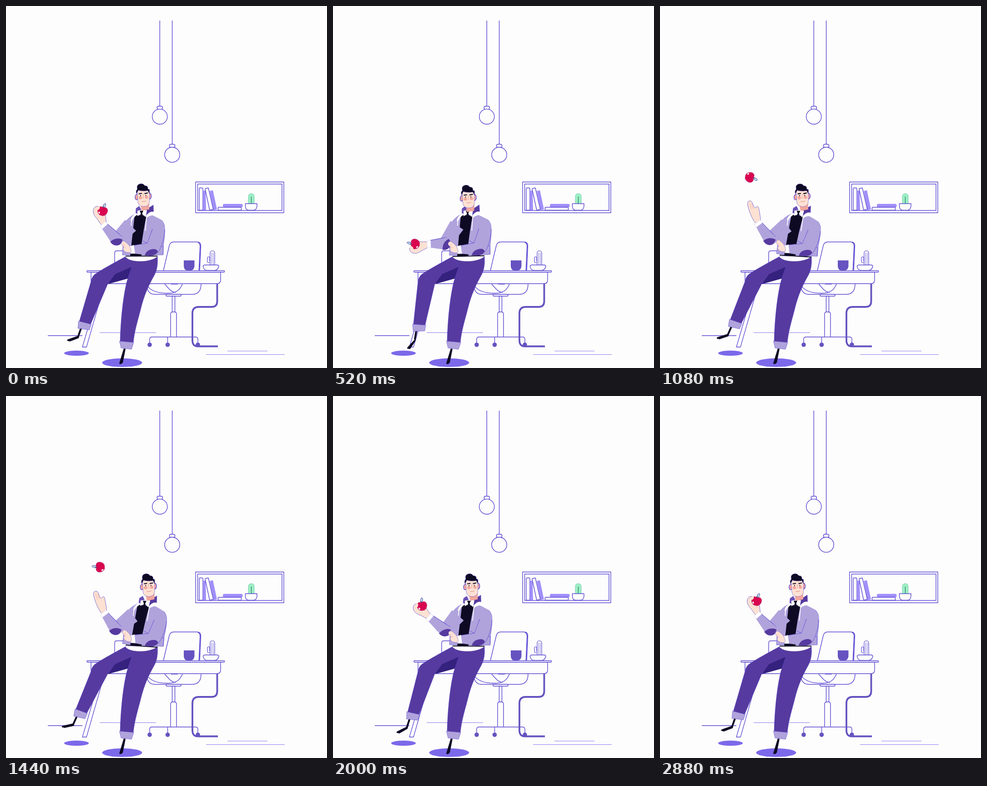
These frames come from a looping animation (706 px wide and 794 px high, 2.92 s). An HTML page with a canvas:

```html
<!DOCTYPE html>
<html lang="en">
<head>
<meta charset="utf-8">
<title>Break at the desk</title>
<style>
html, body { margin: 0; width: 100%; height: 100%; overflow: hidden; background: #fdfdfd; }
canvas { display: block; }
</style>
</head>
<body>
<canvas id="stage" width="706" height="794"></canvas>
<script>
const ctx = document.getElementById('stage').getContext('2d');
const LOOP = 2920, STEP = 40;
const BG = '#fdfdfd', LINE = '#5b49d2', SOLID = '#6653c0', LILAC = '#a08ffa';
const JACKET = '#b0a3dc', PANTS = '#563a9f', DARK = '#35217e', INK = '#0e0a24';
const SKIN = '#fde1d3', BLUSH = '#f3a79c', RED = '#d9064f', GROUND = '#7c69ea';
const RAD = Math.PI / 180;

// time, wrist x/y, elbow x/y, hand angle
const ARM = [
  [0, 217, 483, 243, 512, -110],
  [520, 214, 522, 246, 521, -192],
  [800, 210, 490, 244, 513, -151],
  [1160, 219, 479, 241, 511, -108],
  [1440, 218, 480, 241, 511, -112],
  [1680, 217, 483, 243, 512, -120],
  [2000, 215, 488, 246, 514, -137],
  [2440, 217, 485, 244, 512, -116],
  [2920, 217, 483, 243, 512, -110]
];
// time, torso tilt, head x, head y
const BODY = [
  [0, 0, 0, 0],
  [520, -0.02, -2, 3],
  [800, 0.045, 2, 1],
  [1240, 0.07, 3, 0],
  [1440, 0.07, 3, 0],
  [2000, 0.01, 2, 0],
  [2440, 0, 0, 0],
  [2920, 0, 0, 0]
];
// time, shin angle, toe angle
const LEG = [
  [0, 19.3, 20],
  [520, 9.4, 49],
  [800, 18.8, 42],
  [1200, 24.6, 13],
  [1440, 24.6, 13],
  [1720, 21.5, 20],
  [2000, 17.4, 27],
  [2440, 18.9, 21],
  [2920, 19.3, 20]
];
const HELD = [[3, -6], [18, -9], [34, -15], [47, -9], [47, 3], [34, 4], [30, 12], [20, 9], [3, 6]];
const OPEN = [[3, -6], [20, -9], [40, -9], [57, -6], [56, 5], [35, 3], [41, 14], [24, 11], [3, 6]];
const RELEASE = 880, PEAK = 1240, CATCH = 1680;

const mix = (a, b, u) => a + (b - a) * u;
const clamp = u => Math.max(0, Math.min(1, u));

// Monotone cubic through the key rows
function sample(rows, t) {
  let i = 0;
  while (i < rows.length - 2 && t >= rows[i + 1][0]) i++;
  const a = rows[i], b = rows[i + 1], h = b[0] - a[0], u = (t - a[0]) / h;
  const rate = (k, c) => (rows[k + 1][c] - rows[k][c]) / (rows[k + 1][0] - rows[k][0]);
  const tangent = (k, c) => {
    if (k === 0 || k === rows.length - 1) return 0;
    const p = rate(k - 1, c), q = rate(k, c);
    return p * q <= 0 ? 0 : 2 * p * q / (p + q);
  };
  return a.slice(1).map((v, j) => {
    const c = j + 1, m = tangent(i, c) * h, n = tangent(i + 1, c) * h, d = b[c] - v;
    return v + u * (m + u * (3 * d - 2 * m - n + u * (m + n - 2 * d)));
  });
}

function shape(d, fill, stroke, width = 1.4) {
  const p = typeof d === 'string' ? new Path2D(d) : d;
  if (fill) { ctx.fillStyle = fill; ctx.fill(p); }
  if (stroke) { ctx.strokeStyle = stroke; ctx.lineWidth = width; ctx.stroke(p); }
}
const line = (d, width = 1.4, color = LINE) => shape(d, null, color, width);

function oval(x, y, rx, ry, fill, stroke, angle = 0) {
  const p = new Path2D();
  p.ellipse(x, y, rx, ry, angle, 0, Math.PI * 2);
  shape(p, fill, stroke);
}
function box(x, y, w, h, r, fill, stroke = LINE) {
  const p = new Path2D();
  p.roundRect(x, y, w, h, r);
  shape(p, fill, stroke);
}
function poly(pts, fill, stroke, width) {
  const p = new Path2D();
  pts.forEach(([x, y]) => p.lineTo(x, y));
  p.closePath();
  shape(p, fill, stroke, width);
}
function blob(pts, fill, stroke, width) {
  const p = new Path2D(), n = pts.length;
  for (let i = 0; i <= n; i++) {
    const [x, y] = pts[i % n], [nx, ny] = pts[(i + 1) % n];
    if (i === 0) p.moveTo((x + nx) / 2, (y + ny) / 2);
    else p.quadraticCurveTo(x, y, (x + nx) / 2, (y + ny) / 2);
  }
  shape(p, fill, stroke, width);
}
function at(x, y, angle, draw) {
  ctx.save();
  ctx.translate(x, y);
  ctx.rotate(angle);
  draw();
  ctx.restore();
}
function limb(a, b, ra, rb, fill) {
  const dir = Math.atan2(b[1] - a[1], b[0] - a[0]), s = Math.sin(dir), c = Math.cos(dir);
  poly([[a[0] - s * ra, a[1] + c * ra], [b[0] - s * rb, b[1] + c * rb],
        [b[0] + s * rb, b[1] - c * rb], [a[0] + s * ra, a[1] - c * ra]], fill);
}

function lamp(x, y) {
  line(`M${x} 32V${y - 23}`);
  box(x - 6, y - 23, 12, 7, 3, BG);
  oval(x, y, 16.6, 16.6, BG, LINE);
}

function shelf() {
  box(417, 386, 194, 67.5, 0, null);
  box(421.5, 390.5, 185.5, 58, 0, null);
  box(425, 399, 8, 49, 2, BG);
  shape('M433 405H439L440 448H433Z', LILAC);
  shape('M448 406L455 404L464 446L457 448Z', LILAC);
  shape('M438 402Q438 400 440 400L445 399L456 446L448 448Z', BG, LINE);
  box(477, 434, 43.5, 7.5, 3, LILAC, null);
  box(466.5, 441.5, 51, 6.5, 1, BG);
  shape('M533 434V418Q533 411.5 539.5 411.5Q546 411.5 546 418V434Z', '#9cf0c3', '#6fbfa8', 0.8);
  line('M539.5 418V434', 1.2, '#2f6c70');
  shape('M526.5 433.5H552V439Q551 448 544 448H534Q527 448 526.5 439Z', BG, LINE);
}

function chair() {
  shape('M346 581L359 526Q361 517.5 369 517.5H420Q428.5 517.5 428.5 526L426 581', BG, LINE);
  line('M422 518.5Q427 520 427 527L424.5 580', 1.8);
  line('M309 610C310 625 316 632 326 632.5H410C423 632 429 624 429 610');
  line('M309 611C318 627 338 630 355 630C374 630 382 624 388 610');
  line('M349 610L360 622Q366 628 374 628');
  line('M363 610H378');
  box(352, 632.5, 33, 4, 2, BG);
  box(365.5, 636.5, 6, 36, 0, BG);
  shape('M362 726V676Q362 671 367 671H370Q375 671 375 676V726', BG, LINE);
  line('M316 739V731Q316 726 321 726H417Q422 726 422 731V739M355.5 726V739');
  [316, 355.5, 422].forEach(x => oval(x, 743, 4.8, 4.8, SOLID));
}

function desk() {
  poly([[168, 748], [177, 748], [217, 609], [209, 609]], BG, LINE, 1.3);
  line('M464.5 609V648Q464.5 660 452 660H424Q410 660 410 674V733Q410 746.5 422 746.5H466', 3.8, SOLID);
  line('M239 564V542Q239 537 244 537H266');
  shape('M187 583.5V602Q187 609 194 609H464Q472 609 472 601V583.5Z', BG, LINE);
  box(178, 580.5, 302.5, 3.2, 1, BG);
  shape('M391 558H414.5V571Q413 580 406 580H399Q392 580 391 571Z', SOLID);
  shape('M449 568V542Q449 537 454 537Q459 537 459 542V568', BG, LINE, 1.2);
  line('M452.5 568V541M456 568V541', 0.8);
  line('M449 563H446Q443 563 443 559V553Q443 550 446 550Q448 550 448 553V560', 1.2);
  shape('M433.5 571Q434 568 438 568H464Q468 568 468 571Q466 580 458 580H443Q435 580 433.5 571Z', BG, LINE);
}

function room() {
  ctx.fillStyle = BG;
  ctx.fillRect(0, 0, 706, 794);
  lamp(338.3, 242.7);
  lamp(365.6, 326.3);
  shelf();
  line('M92 723H168', 1.3);
  line('M206 716.5H330M487 756.8H575M440 764.5H613', 1, '#8a7cf0');
  chair();
  desk();
  oval(155, 761.5, 27, 5.8, GROUND);
  oval(255.5, 782.3, 44, 9.5, GROUND);
}

function legs(t) {
  const [shin, toe] = sample(LEG, t), a = shin * RAD, c = Math.cos(a), s = Math.sin(a);
  const local = (x, y) => [206 + x * c - y * s, 605 + x * s + y * c];
  const ankle = local(-5, 109), bend = local(-5, 129);
  const tip = [bend[0] - 25.5 * Math.cos(toe * RAD), bend[1] + 25.5 * Math.sin(toe * RAD)];

  ctx.lineJoin = 'round';
  line(`M${ankle}L${bend}`, 4, INK);
  poly([[bend[0] + 2, bend[1] - 2], [bend[0] + 1, bend[1] + 3], [tip[0] + 6, tip[1] + 1.5],
        tip, [tip[0] + 1, tip[1] - 2]], INK, INK, 1);
  const left = local(-13.5, 97), right = local(12, 96);
  shape(`M264 549C242 561 212 577 196 588Q189 593 187 604L${left}L${right}L224 609L277 573L290 549Z`, PANTS, LINE, 0.6);
  poly([local(-15.5, 96.5), local(13.5, 94), local(13.5, 107), local(-11.5, 112)], JACKET, LINE, 0.6);

  shape('M277 572L240 588L224 610L271 597Z', DARK);
  shape('M259 751L263 752L257 782Q252 788 249 784Z', INK);
  shape('M262 549H333C334 566 333 578 326 591C314 612 304 634 297 662C290 690 283 710 280 738L251 736C252 696 256 648 264 612C267 598 273 583 277 572Z', PANTS, LINE, 0.6);
  shape('M249.5 735L281 738L276 753L253 750Z', JACKET, LINE, 0.6);
  shape('M262 549C270 564 321 563 333 549Z', '#fff');
}

function torso() {
  shape('M288 454C276 460 264 468 260 480L256 546H345L346 527C348 510 350 496 349 488C350 474 338 463 319 451Z', JACKET, LINE, 0.7);
  shape('M283 458L309 460C304 482 301 502 298 523V549H273Z', INK);
  shape('M286 444L293 439L299 450L285 459Z', '#6a50b3', LINE, 0.6);
  shape('M309 446L324 436.5L324.5 452L309 461Z', PANTS, LINE, 0.6);
  shape('M289 449L299 447L310 448L307 463L299 455L289 461Z', '#fff');
  shape('M294 449L302 449L299.5 455L302 463H294L296.5 455Z', INK);
  shape('M308 460Q318 447 328 453Q343 462 347 472Q333 464 322 459Q314 460 308 466Z', '#fff');
  shape('M286 454L290 457Q279 463 276 474L274 470Q276 460 286 454Z', '#fff');
  line('M276 468L274.5 493M309 462L306.5 493', 1.6, '#fff');
  line('M322 489L312 521L301 515', 0.9);
  line('M266 487L262 513M336 527H346V546', 0.8);
  line('M263 548.5H333', 2, INK);
}

function restingArm() {
  shape('M331 466C346 470 350 482 349 492C348 512 342 529 334 541Q329 548 318 547L282 543L280 525L311 520L322 489Z', JACKET);
  line('M349 490C348 512 342 529 334 541M282 525L311 520L322 489', 0.8);
  shape('M305 547Q309 534 325 533Q332 533 334 539Q330 547 318 548Z', PANTS);
  shape('M272 527L281 524.5L284 543L274 543Z', '#fff', '#d9d3f4', 0.5);
  blob([[252, 522], [257, 514], [265, 519], [273, 527], [277, 541], [264, 541], [256, 534], [260, 528]], SKIN, LINE, 0.5);
  line('M255 525L262 523M258 530L263 528', 0.7, BLUSH);
}

function head() {
  shape('M296 432H315V446L299 449Z', BLUSH);
  oval(287.5, 419, 3.5, 6, BLUSH, LINE, 0.1);
  oval(316, 417, 3.5, 6.5, BLUSH, LINE);
  shape('M288.5 402H315.5V430Q314 440 302 440Q291 439 290 430Z', SKIN, LINE, 0.6);
  shape('M287 412Q285 404 289 402Q286 392 295 390Q302 389 305 394Q313 394 312 401L315.5 403V412L312 405Q300 407 291 404Z', INK, LINE, 0.5);
  line('M292 412L299 411M304.5 411.5L312 410', 2.2, INK);
  oval(296, 416, 1, 1.3, INK);
  oval(307.5, 415.5, 1, 1.3, INK);
  oval(295.5, 420.5, 3.7, 3.3, BLUSH);
  oval(309, 419.5, 3.7, 3.3, BLUSH);
  line('M302 411V421L300.5 422', 1.2, '#e9a89a');
  line('M298.5 428.5Q303 430 308 427.5', 1, '#d68478');
}

function apple(x, y, angle) {
  at(x, y, angle, () => {
    oval(1.5, -12.5, 2.2, 5, '#b9e3e6', '#7b78bd', 0.25);
    line('M0 -7L-1 -11', 1.2, INK);
    shape('M0 -7C4 -11 12 -8 11 0C10 7 5 11 0 10C-5 11 -10 7 -11 0C-12 -8 -4 -11 0 -7Z', RED, '#a22573', 0.6);
    oval(-6.5, 5, 1.6, 2.4, '#fff', null, -0.5);
  });
}

function pose(t) {
  const [wx, wy, ex, ey, deg] = sample(ARM, t), a = deg * RAD;
  return {
    wrist: [wx, wy], elbow: [ex, ey], angle: a,
    palm: [wx + 33 * Math.cos(a) - 7 * Math.sin(a), wy + 33 * Math.sin(a) + 7 * Math.cos(a)]
  };
}

function appleAt(t, arm) {
  if (t <= RELEASE || t >= CATCH) return arm.palm;
  const up = t < PEAK, end = pose(up ? RELEASE : CATCH).palm;
  const u = up ? (PEAK - t) / (PEAK - RELEASE) : (t - PEAK) / (CATCH - PEAK);
  return [mix(up ? 203 : 207, end[0], u), mix(363, end[1], u ** 2.5)];
}

function appleSpin(t) {
  return sample([[0, 12], [520, -88], [800, -18], [1440, 268], [1700, 346], [2000, 350], [2440, 363], [2920, 372]], t)[0] * RAD;
}

function throwingArm(t, arm, tilt) {
  const { wrist, elbow, angle } = arm;
  const shoulder = [274 + tilt * 70, 481];
  const fore = Math.atan2(wrist[1] - elbow[1], wrist[0] - elbow[0]);
  const turn = (fore > 0 ? fore - 2 * Math.PI : fore) + 132 * RAD;
  const grip = clamp(t < PEAK ? (920 - t) / 80 : (t - 1640) / 80);

  limb(shoulder, elbow, 17, 13.5, JACKET);
  oval(...elbow, 13.5, 13.5, JACKET);
  at(...elbow, turn, () => shape('M-13.5 5Q-2 -6 13 0Q11 13 0 13Q-10 12 -13.5 5Z', PANTS));
  limb(elbow, wrist, 13.5, 8, JACKET);
  at(...elbow, turn, () => shape('M-13.5 5Q-2 -6 13 0Q11 13 0 13Q-10 12 -13.5 5Z', PANTS));
  at(...elbow, fore, () => line(`M-4 13.5L${Math.hypot(wrist[0] - elbow[0], wrist[1] - elbow[1])} 8M12 11`, 0.7));
  at(...elbow, fore, () => line(`M4 12.5L${Math.hypot(wrist[0] - elbow[0], wrist[1] - elbow[1])} 8`, 0.8));

  at(...wrist, angle, () => {
    blob(HELD.map(([x, y], i) => [mix(OPEN[i][0], x, grip), mix(OPEN[i][1], y, grip)]), SKIN, LINE, 0.7);
    line(grip > 0.5 ? 'M20 2L27 5' : 'M38 -3L51 -2M36 1L49 2', 0.7, BLUSH);
  });
  at(...wrist, fore, () => shape('M-1 -8H7V8H-1Z', '#fff', '#d4cdf3', 0.6));

  apple(...appleAt(t, arm), appleSpin(t));
  if (grip > 0.5) at(...wrist, angle, () => oval(42, 0, 3, 4.5, SKIN, null, -0.5));
}

function render(t) {
  const [tilt, hx, hy] = sample(BODY, t), arm = pose(t);
  const lean = draw => {
    ctx.save();
    ctx.translate(298, 550);
    ctx.rotate(tilt);
    ctx.translate(-298, -550);
    draw();
    ctx.restore();
  };
  room();
  legs(t);
  at(tilt * 120 + hx, hy, 0, () => shape('M295 432H315V448L299 452Z', BLUSH));
  lean(torso);
  at(tilt * 120 + hx, hy, 0, head);
  throwingArm(t, arm, tilt);
  lean(restingArm);
}

function tick() {
  render(Math.floor((performance.now() % LOOP) / STEP) * STEP);
  requestAnimationFrame(tick);
}
tick();
</script>
</body>
</html>
```
